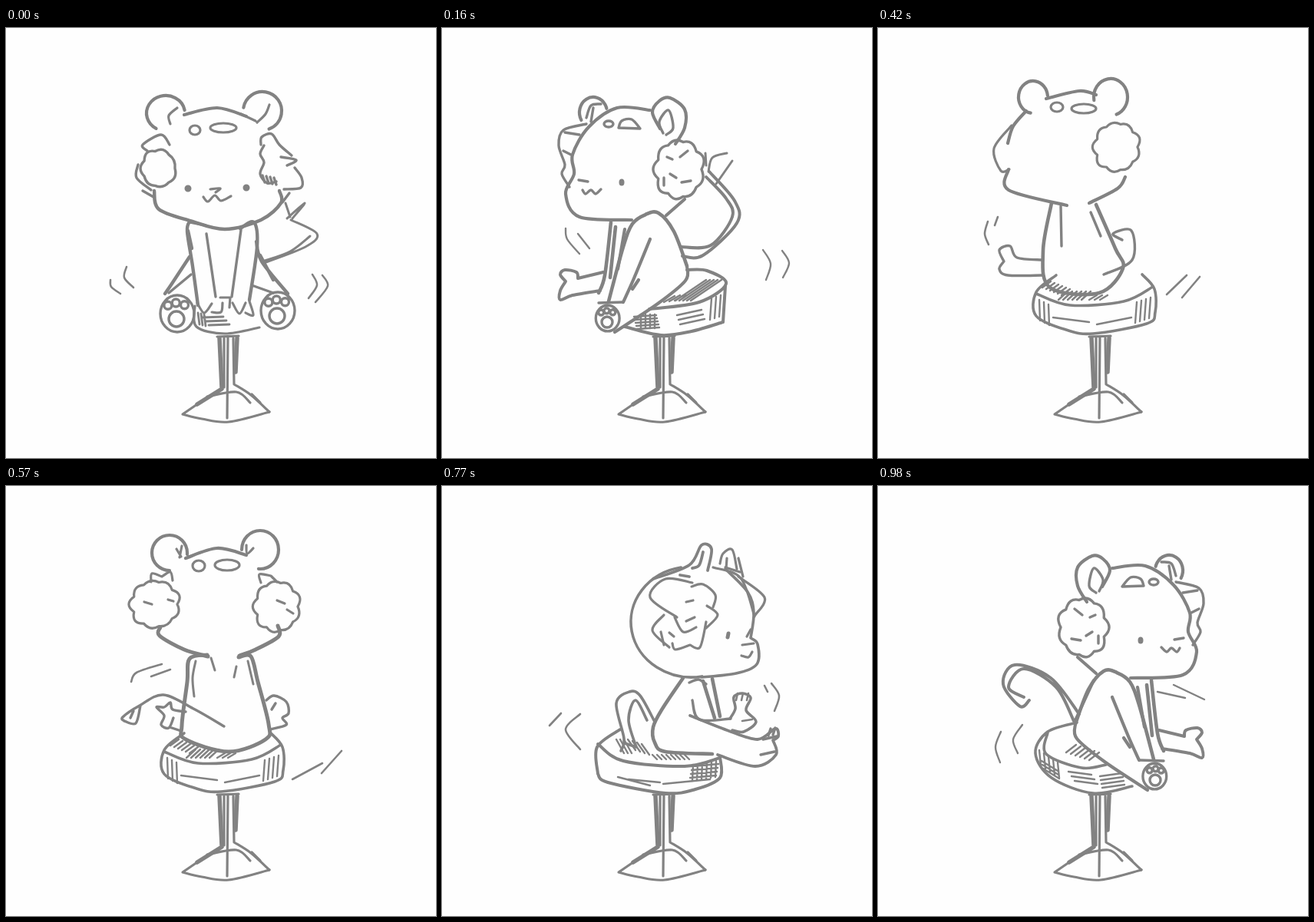
Animation of 560 by 560 pixels, one loop 1000 ms. Source, as an HTML page with a canvas:

```html
<!DOCTYPE html>
<html lang="en">
<head>
<meta charset="utf-8">
<title>Spinning on a stool</title>
<style>
html, body { margin: 0; width: 100%; height: 100%; overflow: hidden; background: #fefefe; }
canvas { display: block; }
</style>
</head>
<body>
<canvas width="560" height="560"></canvas>
<script>
const ctx = document.querySelector('canvas').getContext('2d');
const rad = degrees => degrees * Math.PI / 180;

const shapes = {
  // Smooth curve through points; a repeated point makes a corner.
  curve(path, n) {
    const p = [];
    for (let i = 0; i < n.length; i += 2) p.push([n[i], n[i + 1]]);
    path.moveTo(...p[0]);
    for (let i = 0; i < p.length - 1; i++) {
      const b = p[i], c = p[i + 1], a = p[i - 1] || b, d = p[i + 2] || c;
      if (b[0] === c[0] && b[1] === c[1]) continue;
      path.bezierCurveTo(b[0] + (c[0] - a[0]) / 6, b[1] + (c[1] - a[1]) / 6,
        c[0] - (d[0] - b[0]) / 6, c[1] - (d[1] - b[1]) / 6, c[0], c[1]);
    }
  },
  // Elliptic arc between two angles, or a whole oval.
  arc(path, [x, y, rx, ry, from = 0, to = 360]) {
    const a = rad(from);
    path.moveTo(x + rx * Math.cos(a), y + ry * Math.sin(a));
    path.ellipse(x, y, rx, ry, 0, a, rad(to));
  },
  hatch(path, [x1, y1, x2, y2, count, dx, dy]) {
    for (let i = 0; i < count; i++) {
      path.moveTo(x1 + i * dx, y1 + i * dy);
      path.lineTo(x2 + i * dx, y2 + i * dy);
    }
  },
  // Fluffy outline made of uneven bumps around an oval.
  fluff(path, [x, y, rx, ry, bumps]) {
    const at = (i, k) => {
      const a = rad(360 * i / bumps);
      return [x + k * rx * Math.cos(a), y + k * ry * Math.sin(a)];
    };
    path.moveTo(...at(0, 1));
    for (let i = 0; i < bumps; i++)
      path.quadraticCurveTo(...at(i + .5, 1.3 + .12 * Math.sin(i * 5)), ...at(i + 1, 1));
  },
  // Sole of a foot: outline, pad and three toes.
  paw(path, [x, y, r]) {
    shapes.arc(path, [x + .1 * r, y - .7 * r, 2.2 * r, 2.4 * r]);
    shapes.arc(path, [x, y, r, r]);
    for (const a of [-122, -92, -60])
      shapes.arc(path, [x + 2.1 * r * Math.cos(rad(a)), y + 2.1 * r * Math.sin(rad(a)), r / 2, r / 2]);
  }
};

// Strokes are split by "/", may start with a shape name, and "!" marks a corner.
function ink(width, text) {
  const path = new Path2D();
  for (const part of text.split('/')) {
    const kind = part.match(/[a-z]+/);
    const numbers = part.replace(/(\S+ \S+)!/g, '$1 $1').match(/-?\d+/g).map(Number);
    shapes[kind ? kind[0] : 'curve'](path, numbers);
  }
  return { width, path };
}

const pedestal = [
  ink(5.5, '278 404 281 468/301 404 299 448/281 470 249 490'),
  ink(3.2, '275 402 303 401/289 402 288 508/284 404 284 468/296 404 297 464! 319 478 343 500'),
  ink(3.2, '249 490 230 503! 255 509 290 513 343 500/262 480 300 474 318 488/320 477 331 488')
];

const front = [
  ink(4.2, 'arc 208 111 25 23 120 350/arc 334 108 25 25 190 430/232 113 275 104 313 115'),
  ink(4.4, '193 212 199 236 240 251 285 262 332 250 358 228 356 212'),
  ink(3.2, '214 125 212 114 223 104/327 123 338 112 343 100/306 112 325 121/arc 246 133 7 6/arc 283 130 17 6'),
  ink(3.2, '266 210 279 209 273 214/257 220 263 226 272 218 280 225 293 219'),
  ink(5, 'arc 237 209 2 2/arc 313 208 2 2'),
  ink(3.4, 'fluff 199 183 21 23 7/184 160 178 152 202 139 213 152/172 178 170 195 189 211/178 212 192 220'),
  ink(3.4, '332 152 333 142 346 138 356 152 372 166/336 153 331 164 336 175 331 190 340 202 352 200'),
  ink(3.4, '358 168 378 172 366 179/376 182 385 195 384 208 362 210/369 215 360 227/hatch 334 192 337 201 4 5 1'),
  ink(4.4, '239 252 236 265 243 310 250 361/237 264 242 287/305 261 323 253 327 285 317 354'),
  ink(4.4, '239 298 216 333 207 346/326 278 333 304 367 346/331 296 348 328'),
  ink(3.4, '240 253 260 257/261 268 273 350/306 263 294 350/241 321 212 345/320 335 348 345'),
  ink(3.4, 'paw 222 379 10/paw 353 375 10'),
  ink(3.2, '246 362 248 389 285 398 330 390/249 358 258 371 268 359/268 370 280 370 282 358'),
  ink(3.2, '279 351 292 351! 291 364/295 358 304 372 312 358/317 356 322 374 312 371'),
  ink(2.8, 'hatch 250 371 252 386 3 4 1/hatch 256 377 283 376 3 4 5'),
  ink(3, '336 306 390 285 405 268 371 250/337 303 370 291 396 271/366 248 389 228 373 248/364 228 370 246'),
  ink(2.6, '136 328 137 337 149 346/157 311 154 325 166 338'),
  ink(2.6, '399 321 405 335 394 352/412 322 419 336 403 357')
];

// Seen three quarters from the front.
const turn = [
  ink(4.2, 'arc 197 110 18 20 150 345/284 131 274 110 283 95 297 91 316 106 316 130 304 151'),
  ink(4.2, '271 107 228 104 191 129 170 165 172 190 161 216 179 246 247 250/292 244 316 223'),
  ink(3.4, '188 117 194 101 207 99/194 122 197 104/288 137 283 122 295 107 301 130 292 139'),
  ink(3.4, 'arc 217 125 6 4/230 130 234 121 247 119 258 131! 230 130'),
  ink(3.4, '178 198 190 200/183 211 187 216 194 211 200 216 207 210'),
  ink(5, 'arc 234 201 1 2'),
  ink(3.4, 'fluff 309 184 29 36 9/293 168 300 171/320 160 310 168/297 190 305 195/289 195 289 205/312 201 324 199'),
  ink(3.4, '188 125 158 133 152 153 160 178 156 190 166 207/160 136 179 139/158 160 168 165'),
  ink(4.6, '220 253 212 322 204 345/226 259 219 325/217 356 236 285 248 255 265 243 282 241 302 265 319 310'),
  ink(4.2, '319 310 317 329 281 359 225 396/238 262 229 314/271 275 250 326 236 357/256 328 248 340'),
  ink(4, '210 318 177 326! 175 318 160 315 154 321 161 330! 154 342 154 354 170 348 206 342'),
  ink(3.4, 'paw 215 383 7/204 358 236 357')
];
const turnSet = [
  ink(4, '319 315 345 316 370 333 335 357 270 366/369 336 366 383! 325 395 285 400 238 389'),
  ink(2.4, 'hatch 289 357 303 349 3 7 -1/hatch 304 355 344 328 5 5 0/hatch 250 376 279 374 5 1 4'),
  ink(2.4, 'hatch 259 373 259 391 4 6 0/hatch 351 352 349 380 3 6 -2/hatch 310 386 342 379 3 -2 -6'),
  ink(4, '311 285 350 283 378 246 370 222 344 194/313 297 340 296 384 254 381 225 348 187'),
  ink(3, '347 187 352 169 371 163/357 203 378 173/344 179 343 163'),
  ink(2.4, '161 261 163 275 179 294/177 268 192 287/418 289 428 307 422 328/443 290 452 306 444 325')
];

const side = [
  ink(3.6, 'arc 241 177 79 72 -80 100'),
  ink(3.6, '228 249 183 244 156 232 155 206 164 198! 160 165 168 138 197 108'),
  ink(3.2, '180 118 146 145 158 168/178 112 197 106/160 205 175 207/162 216 167 223 176 221/164 187 169 196'),
  ink(5, '193 192 194 197'),
  ink(3.2, '213 158 210 142 226 128 241 131/240 126 275 121 295 145 260 171/277 168 292 188 270 210'),
  ink(3.2, '221 156 207 168 222 185/222 177 230 210 243 207! 262 213 266 205/281 190 277 207/264 196 270 191'),
  ink(4.6, '214 251 204 300/226 254 211 302/252 250 279 290 291 314 289 334 275 346 214 349'),
  ink(3.8, '243 299 195 318 155 330 132 316 128 326 135 331! 131 350 158 365 207 350'),
  ink(3.4, '222 258 232 252 244 256/240 279 231 304 190 303/133 346 151 350/130 326 148 330/hatch 132 315 135 324 2 6 1'),
  ink(3.6, '191 303 184 290 186 275 175 270 164 276 170 292 157 307 173 320 188 318'),
  ink(2.6, 'hatch 167 270 169 279 3 7 0/162 304 175 306'),
  ink(4, '204 353 204 380 236 395 275 400 350 386 363 375! 364 340 334 317/204 354 250 365 330 358 363 336'),
  ink(2.4, 'hatch 209 358 210 379 6 6 1/hatch 206 362 240 365 4 1 5/hatch 244 356 250 350 8 6 0'),
  ink(2.4, 'hatch 296 350 306 336 4 6 -2/hatch 319 348 329 330 3 5 0/217 382 278 388/282 386 323 382/295 390 337 379'),
  ink(3.6, '289 307 308 273 322 268 339 283 329 329 333 345/299 305 314 279 323 305 313 340! 328 335'),
  ink(2.6, '137 257 127 273 133 293/146 260 142 268/386 297 405 317 386 343/411 296 426 312')
];
const leftEars = [
  ink(4, '216 101 214 85 235 76 256 98 250 115 228 121/220 85 230 94 231 116/197 108 222 111'),
  ink(3, '193 100 190 90 196 84 213 101/198 91 207 108/256 116 276 113')
];
const rightEars = [
  ink(3.8, '275 121 322 103 338 77 351 82 346 110/340 86 335 103 326 107/310 116 322 118'),
  ink(3.2, '362 101 366 88 378 83 384 108/371 94 370 108/353 106 389 120 407 170/386 94 392 118'),
  ink(3.2, '303 171 314 190 331 184/318 176 329 171/318 151 327 149')
];

const backSeat = [
  ink(3.6, '232 322 206 344 206 375 245 393 280 398 350 385 361 370 360 340 344 321/206 346 250 361 320 356 358 337'),
  ink(2.4, 'hatch 214 338 225 330 6 5 2/hatch 235 354 247 343 6 6 0/hatch 275 354 285 348 3 7 0'),
  ink(2.4, 'hatch 210 354 211 381 3 6 3/228 377 275 383/285 386 330 377/hatch 337 357 335 384 4 6 -2')
];
const back = [
  ...backSeat,
  ink(4.2, 'arc 213 87 23 23 90 365/arc 331 83 24 25 180 455/234 94 275 81 313 90'),
  ink(5, '201 184 200 195 232 213 263 222/354 182 355 196 325 213 304 221'),
  ink(3.2, '222 82 228 92/229 78 226 93/313 77 314 88 322 81/arc 251 104 8 7/arc 288 103 16 7'),
  ink(3.2, 'fluff 194 154 29 29 9/189 125 190 114 203 118! 214 112 217 123/180 151 190 154/211 148 218 150'),
  ink(3.2, 'fluff 353 157 27 31 9/332 126 330 115 345 117! 353 125/353 149 363 153/366 161 374 166'),
  ink(5, '262 220 239 225 236 255 229 312 234 330 290 346 338 330 342 310 328 255 319 222 303 223'),
  ink(3, '267 224 272 240/300 235 297 249/247 228 243 250 245 274/315 228 322 258'),
  ink(3.4, '234 294 217 291 214 282 206 288 196 288 206 299 202 311 212 315 218 302/213 314 228 319'),
  ink(3.4, '339 279 349 273 365 281 368 296 360 302 365 311 344 317/351 283 346 291'),
  ink(3.4, '284 313 246 291 205 272 174 286 152 301 154 306! 169 309 175 286/166 293 162 302'),
  ink(2.6, '163 255 170 243 203 232/189 248 214 239/373 382 412 361/411 374 437 345')
];

// Seen three quarters from behind.
const away = [
  ...backSeat,
  ink(4.2, 'arc 202 90 19 21 100 355/arc 303 90 22 24 170 430/219 92 262 82 284 87'),
  ink(4.2, '193 108 176 128 169 150/170 184 170 211 246 231/322 194 312 209 275 228'),
  ink(3.2, 'fluff 311 155 27 30 9/174 127 151 157 160 186 171 184/arc 233 103 8 6/arc 268 105 16 6'),
  ink(4.6, '226 228 215 290 224 338 288 345 319 313 309 287 284 230'),
  ink(3.4, '238 232 239 284/277 240 290 271/214 302 181 299 172 284 158 289 164 304! 158 314 169 322 214 322'),
  ink(3.4, '294 321 331 302 330 264 306 268 318 276'),
  ink(2.6, '143 252 139 268 144 282/156 246 152 257/376 347 402 322/396 351 419 324')
];

const rightSet = [
  ink(3.6, '259 308 221 320 205 348 226 380 280 400 331 391/221 321 219 349 265 367 297 363'),
  ink(2.4, 'hatch 210 344 212 364 5 6 4/hatch 213 358 234 371 3 1 5/hatch 245 347 258 337 6 6 2'),
  ink(2.4, 'hatch 248 372 278 376 3 4 6/hatch 289 378 318 374 4 1 5'),
  ink(4, '262 297 225 250 178 233 163 258 185 287 197 279/255 306 232 262 190 238 170 262 190 275/257 305 281 253'),
  ink(2.4, '160 320 153 340 159 360/188 311 176 330 182 348/364 268 400 276/385 259 425 278')
];

// Each pose: start in ms, plain strokes, strokes mirrored about x = axis / 2.
const poses = [
  { at: 0, plain: front },
  { at: 160, plain: [...turn, ...turnSet] },
  { at: 320, plain: [...side, ...leftEars] },
  { at: 420, plain: away },
  { at: 570, plain: back },
  { at: 670, mirrored: away, axis: 566 },
  { at: 770, plain: rightEars, mirrored: side, axis: 566 },
  { at: 980, plain: rightSet, mirrored: turn, axis: 576 }
];

function paint(strokes = []) {
  for (const { width, path } of strokes) {
    ctx.lineWidth = width;
    ctx.stroke(path);
  }
}
function frame() {
  const time = performance.now() % 1000;
  const pose = poses.findLast(p => p.at <= time);
  ctx.fillStyle = '#fefefe';
  ctx.fillRect(0, 0, 560, 560);
  ctx.strokeStyle = '#828282';
  ctx.lineCap = ctx.lineJoin = 'round';
  paint(pedestal);
  paint(pose.plain);
  ctx.save();
  ctx.transform(-1, 0, 0, 1, pose.axis || 0, 0);
  paint(pose.mirrored);
  ctx.restore();
  requestAnimationFrame(frame);
}
frame();
</script>
</body>
</html>
```
